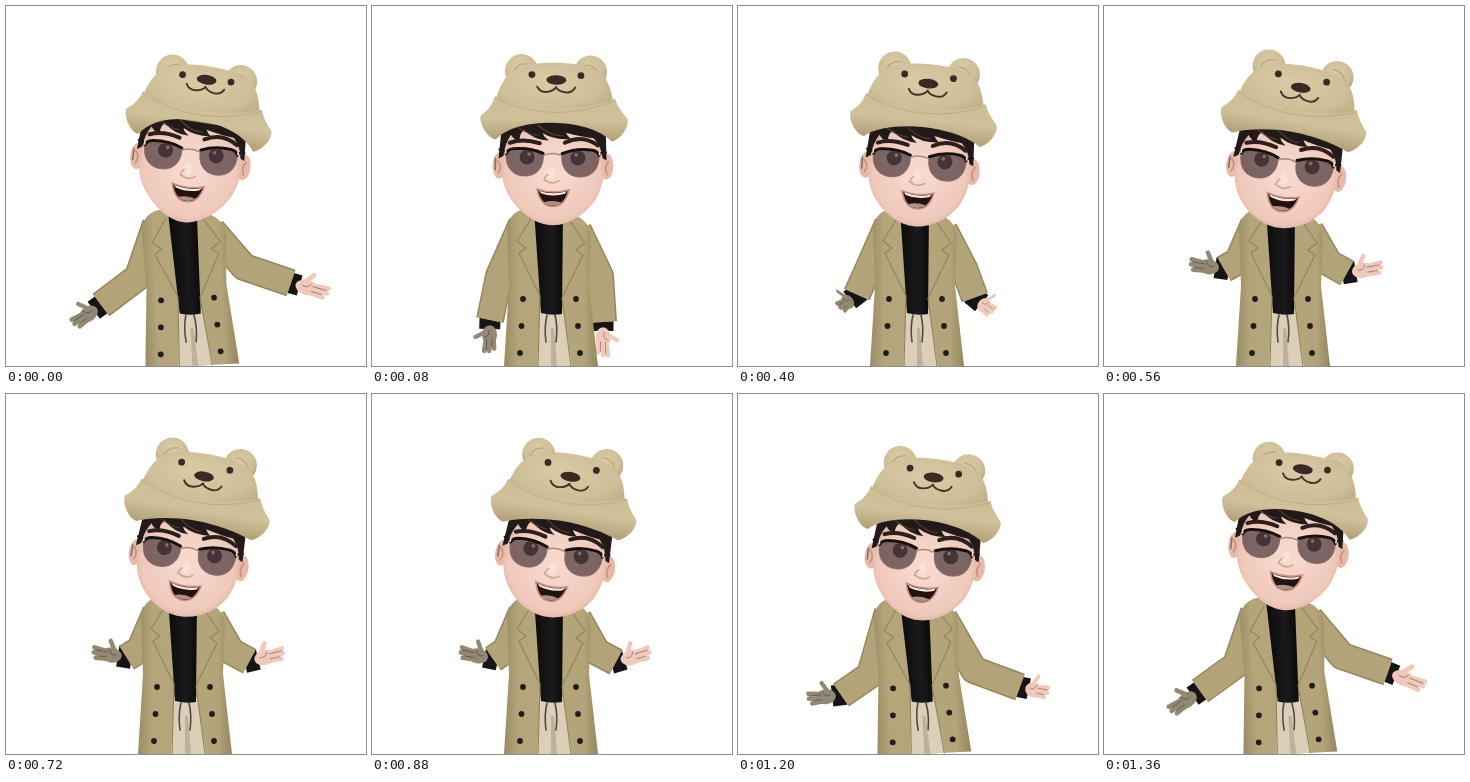
An HTML page for the animation above (1440 ms loop, 360 by 360 pixels).

```html
<!DOCTYPE html>
<html lang="en">
<head>
<meta charset="utf-8">
<title>Avatar shrug</title>
<style>
  html, body { margin: 0; width: 100%; height: 100%; overflow: hidden; background: #fff; }
  svg { display: block; width: 100vw; height: 100vh; }
  .line { fill: none; stroke-linecap: round; stroke-linejoin: round; }
</style>
</head>
<body>
<svg viewBox="0 0 360 360">
  <defs>
    <radialGradient id="skin" cx=".5" cy=".5" r=".6">
      <stop offset=".2" stop-color="#f6d8cc"/><stop offset=".75" stop-color="#efc8ba"/><stop offset="1" stop-color="#d29c8b"/>
    </radialGradient>
    <radialGradient id="felt" cx=".45" cy=".35" r=".65">
      <stop offset="0" stop-color="#dacba7"/><stop offset=".65" stop-color="#cfbf98"/><stop offset="1" stop-color="#b7a67d"/>
    </radialGradient>
    <linearGradient id="rim" x2="0" y2="1">
      <stop offset="0" stop-color="#cdbd95"/><stop offset=".5" stop-color="#d1c19b"/><stop offset="1" stop-color="#b09f75"/>
    </linearGradient>
    <linearGradient id="coat">
      <stop offset="0" stop-color="#998b63"/><stop offset=".15" stop-color="#b4a57b"/>
      <stop offset=".85" stop-color="#b3a479"/><stop offset="1" stop-color="#94865e"/>
    </linearGradient>
    <linearGradient id="knit">
      <stop offset="0" stop-color="#0b0b0c"/><stop offset=".6" stop-color="#1a1a1c"/><stop offset="1" stop-color="#0b0b0c"/>
    </linearGradient>
    <g id="hand" class="line" stroke="currentColor">
      <ellipse cx="9" rx="11" ry="7.5" fill="currentColor" stroke="none"/>
      <path stroke-width="4.6" d="M11-3 28-5M12 0 28 0M10 4 25 5M5-3 12-14"/>
      <path stroke="#0006" stroke-width=".8" d="M14-2.5 27-2.7M14 2.5 24 2.6M4-1Q10 1 12-5"/>
    </g>
    <g id="lens">
      <ellipse cx="1" cy="-2" rx="13" ry="9" fill="#e8dcd2"/>
      <circle cx="2" cy="-3" r="7.5" fill="#1d1412"/>
      <circle cx="4" cy="-6" r="1.8" fill="#fff"/>
      <path d="M-19-8Q0-12 18-8C20 8 11 16 0 16-12 16-20 8-19-8Z" fill="#553f41" fill-opacity=".74" stroke="#806866" stroke-width=".9"/>
      <path class="line" d="M-19-6Q-18-10-12-11 4-13 18-7" stroke="#17100f" stroke-width="3"/>
    </g>
  </defs>

  <g id="arms"></g>

  <g id="body">
    <path fill="url(#coat)" d="M158 202C147 203 137 207 135 224L137 280 132 360H226L217 280 219 230C217 215 208 211 196 206Z"/>
    <path fill="#dccfb9" d="M168 303H191L200 360H165Z"/>
    <path fill="#c0b097" d="M179 322H182L185 360H179Z"/>
    <path fill="url(#knit)" d="M162 203H191L190 308Q180 310 169 307Z"/>
    <path class="line" stroke="#554a42" stroke-width="1.6" d="M175 309Q172 321 174 336M183 309Q186 321 184 336"/>
    <g class="line" stroke="#92845b" stroke-width="1.1">
      <path d="M160 211 145 235 154 242 147 247 168 290 166 360"/>
      <path d="M195 211 213 237 204 244 211 249 190 292 199 360"/>
    </g>
    <g id="buttons" fill="#211d1b"></g>
  </g>

  <g id="face">
    <g fill="#e8b9a8">
      <ellipse cx="-53" cy="6" rx="7" ry="13"/><ellipse cx="54" cy="5" rx="7" ry="13"/>
    </g>
    <path class="line" d="M-55 1Q-50 7-54 13M56 0Q51 6 55 13" stroke="#c98f7d" stroke-width="1.6"/>
    <path class="line" d="M-57-1V10" stroke="#746f6b" stroke-width="1.5"/>
    <path id="skull" fill="url(#skin)"/>
    <path fill="#211a19" d="M-50-48-54-1-49-4Q-48-16-42-25-39-20-33-19-34-26-29-30-19-20-4-20-10-24-10-27 2-20 18-22 14-25 13-28 29-24 41-23 49-14 50-3L54-1 52-48Z"/>
    <path class="line" d="M-36-33Q-24-25-14-25M-15-35Q-2-24 9-25" stroke="#4a3d39" stroke-width="1.2"/>
    <path class="line" d="M-43-17Q-30-22-13-17M12-18Q29-27 45-16" stroke="#2b201e" stroke-width="4"/>
    <path class="line" d="M-8 20Q-7 15-4 14M-7 20Q0 25 7 20" stroke="#d7a391" stroke-width="1.6"/>
    <ellipse cx="-1" cy="13" rx="4" ry="6" fill="#fff" fill-opacity=".25"/>
    <use href="#lens" x="-27.5"/>
    <use href="#lens" transform="translate(27.5) scale(-1 1)"/>
    <path class="line" d="M-9-5Q0-9 9-5" stroke="#a58c78" stroke-width="1.5"/>
    <path class="line" d="M-46-8-53-10M46-8 53-9" stroke="#211817" stroke-width="2.5"/>
    <path d="M-47-10v4M47-10v4" stroke="#eee6df" stroke-width="1.6"/>
    <g transform="translate(1 -1)">
      <path d="M-16 30Q0 35 16 30 12 47 0 47-12 47-16 30Z" fill="#251210" stroke="#cf8d80" stroke-width="1.6"/>
      <path d="M-14 31.5Q0 36 14 31.5L12 34Q0 38-12 34Z" fill="#f3ebe4"/>
      <path d="M-9 43Q0 40 9 43 5 46 0 46-6 46-9 43Z" fill="#a8948a"/>
    </g>
  </g>

  <g id="hat">
    <g id="ears">
      <circle cx="-33" r="16.5" fill="url(#felt)"/><circle cx="36" r="16.5" fill="url(#felt)"/>
      <path class="line" d="M-42 6Q-40-7-28-7M45 6Q43-7 31-7" stroke="#bdab82" stroke-width="1.5"/>
    </g>
    <path fill="url(#felt)" d="M-62 0C-58-18-56-40-38-50-20-59 24-59 43-50 60-38 58-18 63 0Z"/>
    <path id="brim" fill="url(#rim)"/>
    <path class="line" d="M-59-20Q0 6 61-20" stroke="#bcab82" stroke-width=".9"/>
    <g fill="#3c2923" transform="translate(2)">
      <circle cx="-24.5" cy="-44.5" r="3.4"/><circle cx="24.5" cy="-44.5" r="3.4"/>
      <g id="muzzle">
        <ellipse rx="10" ry="4.8"/>
        <path class="line" d="M-19 7Q-16 13-9 12-2 11 0 7 2 11 9 12 16 13 19 7" stroke="#4a3129" stroke-width="1.9"/>
      </g>
    </g>
  </g>
</svg>
<script>
const LOOP = 1440, STEP = 80;
const $ = id => document.getElementById(id);

// Arms list elbow, wrist and fingertip; hat and face list x, y and tilt.
const relaxed = {
  hat: [181.5, 113.5, 1.2], face: [180.5, 154.5, 1], pitch: 39.5, lean: 0,
  left: [127, 270, 118, 314, 117, 347], right: [228, 270, 231, 316, 231, 351]
};
// The wide pose opens the loop and cuts straight to the relaxed one.
const poses = [
  { t: 0, hat: [192, 116, 8.8], face: [184.5, 150, 6.5], pitch: 43, lean: 2.8,
    left: [132, 271, 95, 299, 67, 319], right: [238, 261, 285, 277, 323, 288] },
  { t: 80, ...relaxed },
  { t: 240, ...relaxed },
  { t: 560, hat: [189, 115.5, 9.7], face: [182.5, 160, 8.6], pitch: 34.5, lean: 0,
    left: [134, 255, 120, 263, 85, 258], right: [225, 257, 243, 267, 279, 261] },
  { t: 880, hat: [191, 116, 9.3], face: [183.5, 161.5, 9.4], pitch: 34, lean: 0,
    left: [134, 256, 121, 265, 87, 258], right: [225, 258, 244, 268, 279, 258] },
  { t: 1040, hat: [190, 120, 8.3], face: [185.5, 165.5, 9.3], pitch: 34, lean: 2.4,
    left: [135, 268, 121, 279, 89, 270], right: [227, 267, 249, 278, 285, 264] },
  { t: 1200, hat: [189, 121, 7], face: [187, 162.5, 7.4], pitch: 38, lean: 2.8,
    left: [132, 281, 103, 301, 69, 305], right: [236, 276, 282, 293, 311, 299] },
  { t: 1360, hat: [190.5, 116, 8.8], face: [184.5, 150.5, 6], pitch: 41.5, lean: 2.8,
    left: [132, 271, 96, 297, 66, 318], right: [238, 262, 284, 278, 321, 293] }
];

const flatten = p => [...p.hat, ...p.face, p.pitch, p.lean, ...p.left, ...p.right];
const values = poses.map(flatten);
const wrap = i => (i + poses.length) % poses.length;
const gap = i => (poses[wrap(i + 1)].t - poses[wrap(i)].t + LOOP) % LOOP;
const slope = (i, k) => (values[wrap(i + 1)][k] - values[wrap(i)][k]) / gap(i);

// Monotone cubic: smooth through each pose without overshoot.
function tangent(i, k) {
  const a = slope(i - 1, k), b = slope(i, k);
  return a * b > 0 ? 2 * a * b / (a + b) : 0;
}

function sample(t) {
  const i = poses.findLastIndex(p => p.t <= t), d = gap(i), u = (t - poses[i].t) / d;
  const ease = u * u * (3 - 2 * u);
  return values[i].map((v, k) => v + (values[wrap(i + 1)][k] - v) * ease
    + d * u * (1 - u) * (tangent(i, k) * (1 - u) - tangent(i + 1, k) * u));
}

function arm(shoulder, [ex, ey, wx, wy, tx, ty], flip, skin) {
  const angle = Math.atan2(ty - wy, tx - wx), reach = Math.hypot(tx - wx, ty - wy);
  const at = d => `${wx + d * Math.cos(angle)} ${wy + d * Math.sin(angle)}`;
  const sleeve = `M${shoulder}L${ex} ${ey} ${wx} ${wy}`;
  const stroke = (d, color, width) =>
    `<path d="${d}" fill="none" stroke="${color}" stroke-width="${width}" stroke-linejoin="round"/>`;
  return stroke(`M${at(-5)}L${at(9)}`, '#171416', 21)
    + stroke(sleeve, '#94865e', 28) + stroke(sleeve, '#b2a378', 25)
    + `<use href="#hand" color="${skin}" transform="translate(${at(7)})
      rotate(${angle * 180 / Math.PI}) scale(${(reach - 7) / 30} ${flip})"/>`;
}

function place(id, x, y, tilt = 0) {
  $(id).setAttribute('transform', `translate(${x} ${y}) rotate(${tilt})`);
}

function draw(t) {
  const v = sample(t), pitch = v[6], lift = pitch - 34;
  const chin = 62 + lift * .5, edge = 11 - lift * 1.4;
  place('hat', ...v.slice(0, 3));
  place('face', ...v.slice(3, 6));
  place('muzzle', 0, -pitch);
  place('ears', 0, -51 + lift * .5);
  $('body').setAttribute('transform', `rotate(${-v[7]} 180 210)`);
  $('brim').setAttribute('d', `M-73-2C-74 8-64 21-57 21-46 ${edge + 5}-22 ${edge} 0 ${edge}
    22 ${edge} 46 ${edge + 5} 59 21 68 18 76 6 74-2 68-9 64-14 61-22 30-8-30-8-59-22-62-12-66-8-73-2Z`);
  $('skull').setAttribute('d', `M-50-45C-53 0-53 18-43 36-33 52-16 ${chin} 1 ${chin}
    18 ${chin} 36 52 45 36 54 18 53 0 52-45Z`);
  $('arms').innerHTML = arm('150 218', v.slice(8, 14), -1, '#938873')
    + arm('206 224', v.slice(14), 1, '#f0c9ba');
}

$('buttons').innerHTML = [0, 1, 2].map(i =>
  `<circle cx="${151 - 1.5 * i}" cy="${293 + 27 * i}" r="2.9"/>
   <circle cx="${204 + 2 * i}" cy="${293 + 27 * i}" r="2.9"/>`).join('');

function tick() {
  draw(Math.floor(performance.now() % LOOP / STEP) * STEP);
  requestAnimationFrame(tick);
}
tick();
</script>
</body>
</html>
```
